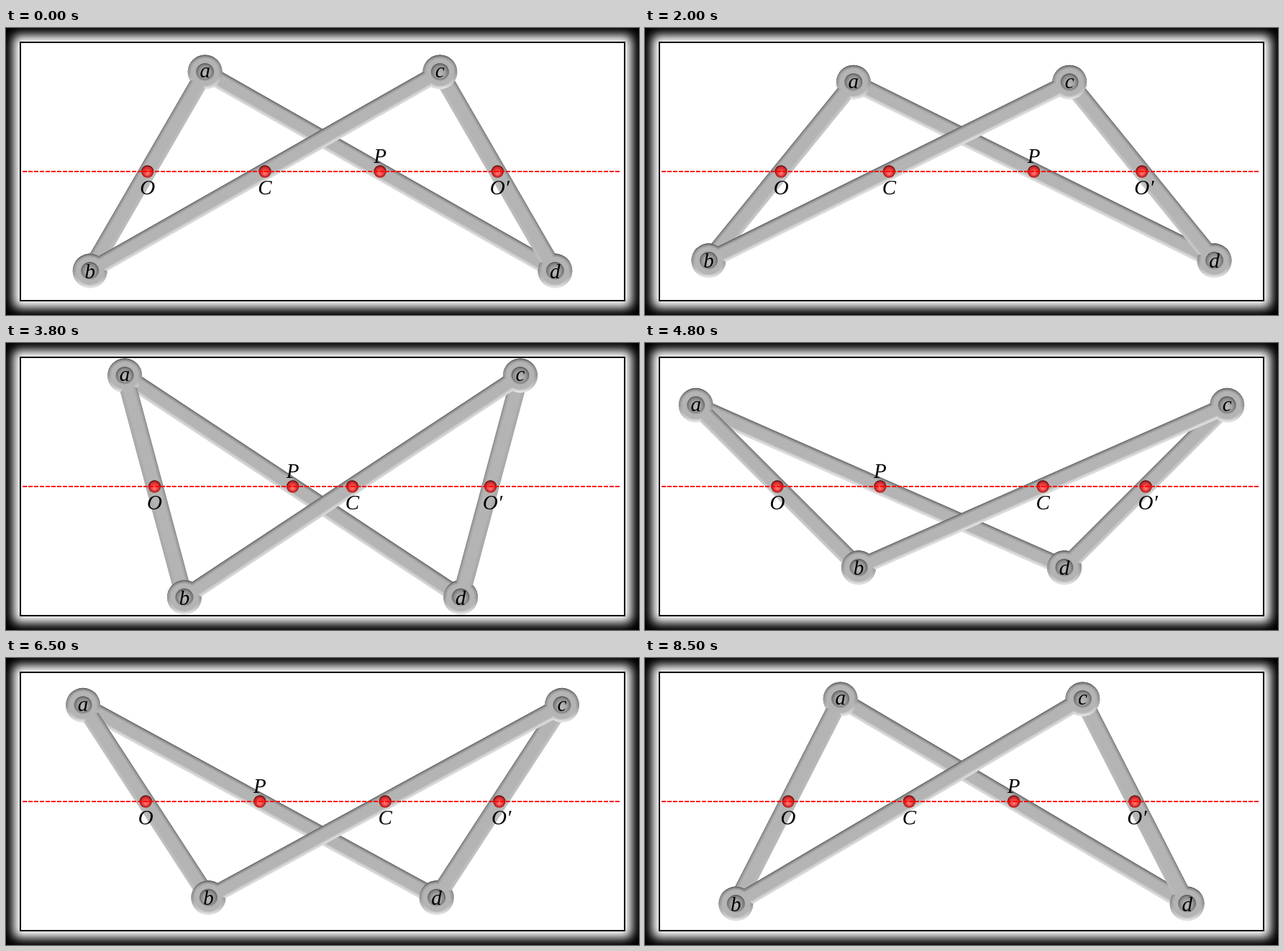
An HTML page with a canvas for the animation above (8.6 s loop, 880 by 400 pixels).

```html
<!DOCTYPE html>
<html>
<head>
<meta charset="utf-8">
<style>
html, body { margin: 0; width: 100%; height: 100%; overflow: hidden; background: #000; }
canvas { display: block; }
</style>
</head>
<body>
<canvas id="stage" width="880" height="400"></canvas>
<script>
const ctx = document.getElementById('stage').getContext('2d');
const TAU = Math.PI * 2;
const STEP = 100, STEPS = 86;
const CX = 440, CY = 200;
const SHORT = 160, LONG = 280; // half lengths of the links
const BASE = 180, BEVEL = 5, BAR = 12, RING = 24;

const gray = v => `rgb(${v | 0},${v | 0},${v | 0})`;

// Crank angle in degrees: swings between 27 and 153, resting one step at each end
function crank(n) {
  if (n < 12) return 60 - 3 * n;
  if (n < 55) return 27 + 3 * (n - 12);
  return 153 - 3 * (n - 55);
}

// Bevel tone for an edge whose normal has vertical part ny, at a given inset
function tone(ny, inset) {
  const edge = ny < 0 ? 150 + 75 * ny : 150 + 80 * ny;
  const k = Math.min(1, inset / BEVEL);
  return gray(edge + (BASE - edge) * (ny < 0 ? Math.sqrt(k) : k * k));
}

function disc(p, r, fill) {
  ctx.fillStyle = fill;
  ctx.beginPath();
  ctx.arc(p.x, p.y, r, 0, TAU);
  ctx.fill();
}

function vertical(p, r, stops) {
  const g = ctx.createLinearGradient(0, p.y - r, 0, p.y + r);
  stops.forEach((c, i) => g.addColorStop(i / (stops.length - 1), c));
  return g;
}

function hole(p) {
  disc(p, 12.5, vertical(p, 12.5, ['#5c5c5c', '#707070', '#a8a8a8']));
  const g = ctx.createRadialGradient(p.x, p.y + 3, 1, p.x, p.y, 11);
  g.addColorStop(0, '#b8b8b8');
  g.addColorStop(0.6, '#a0a0a0');
  g.addColorStop(1, '#7c7c7c');
  disc(p, 11, g);
}

function link(p, q) {
  const len = Math.hypot(q.x - p.x, q.y - p.y);
  const ang = Math.atan2(q.y - p.y, q.x - p.x);
  const ny = Math.cos(ang);
  for (let i = 0; i <= BEVEL; i += 0.5) {
    const tones = [-1, -0.5, 0, 0.5, 1].map(v => tone(v, i));
    for (const e of [p, q]) disc(e, RING - i, vertical(e, RING - i, tones));
    ctx.save();
    ctx.translate(p.x, p.y);
    ctx.rotate(ang);
    const h = BAR - i;
    ctx.fillStyle = tone(-ny, i);
    ctx.fillRect(0, -h, len, h + 0.5);
    ctx.fillStyle = tone(ny, i);
    ctx.fillRect(0, 0, len, h);
    ctx.restore();
  }
  hole(p);
  hole(q);
}

function pin(x) {
  const p = { x, y: CY };
  disc(p, 8.7, vertical(p, 8.7, ['#4a0808', '#a01818', '#b83030']));
  const g = ctx.createRadialGradient(x, CY + 3, 1, x, CY, 7.8);
  g.addColorStop(0, '#ff7070');
  g.addColorStop(0.5, '#f04040');
  g.addColorStop(1, '#b02020');
  disc(p, 7.5, g);
}

function label(text, x, y) {
  ctx.fillText(text, x, y);
}

function frame() {
  ctx.fillStyle = '#000';
  ctx.fillRect(0, 0, 880, 400);
  ctx.save();
  ctx.shadowColor = '#fff';
  ctx.shadowBlur = 14;
  ctx.fillStyle = '#fff';
  ctx.shadowOffsetX = 2000;
  ctx.beginPath();
  ctx.roundRect(10 - 2000, 10, 860, 380, 8);
  ctx.fill();
  ctx.restore();
  ctx.fillStyle = '#fff';
  ctx.fillRect(20, 20, 840, 360);
  ctx.strokeStyle = '#000';
  ctx.lineWidth = 2;
  ctx.strokeRect(20, 20, 840, 360);
}

function axis() {
  ctx.strokeStyle = '#f00';
  ctx.lineWidth = 2;
  ctx.setLineDash([6, 2]);
  ctx.beginPath();
  ctx.moveTo(23, CY);
  ctx.lineTo(853, CY);
  ctx.stroke();
  ctx.setLineDash([]);
}

function draw(now) {
  const t = crank(Math.floor(now / STEP) % STEPS) * Math.PI / 180;
  const dx = SHORT * Math.cos(t), dy = SHORT * Math.sin(t);
  const h = Math.sqrt(LONG * LONG - dy * dy);
  const a = { x: CX - h + dx, y: CY - dy }, c = { x: CX + h - dx, y: CY - dy };
  const b = { x: CX - h - dx, y: CY + dy }, d = { x: CX + h + dx, y: CY + dy };

  frame();
  link(a, d);
  pin(CX + dx);
  link(a, b);
  link(c, d);
  link(b, c);
  pin(CX - h);
  pin(CX - dx);
  pin(CX + h);
  axis();

  ctx.fillStyle = '#000';
  ctx.font = 'italic 29px "Liberation Serif", serif';
  ctx.textAlign = 'center';
  label('a', a.x, a.y + 8);
  label('b', b.x, b.y + 10);
  label('c', c.x, c.y + 8);
  label('d', d.x, d.y + 10);
  label('O', CX - h, 232);
  label('C', CX - dx, 232);
  label('P', CX + dx, 188);
  label('O′', CX + h + 3, 232);
}

function tick(now) {
  draw(now);
  requestAnimationFrame(tick);
}
draw(0);
requestAnimationFrame(tick);
</script>
</body>
</html>
```
